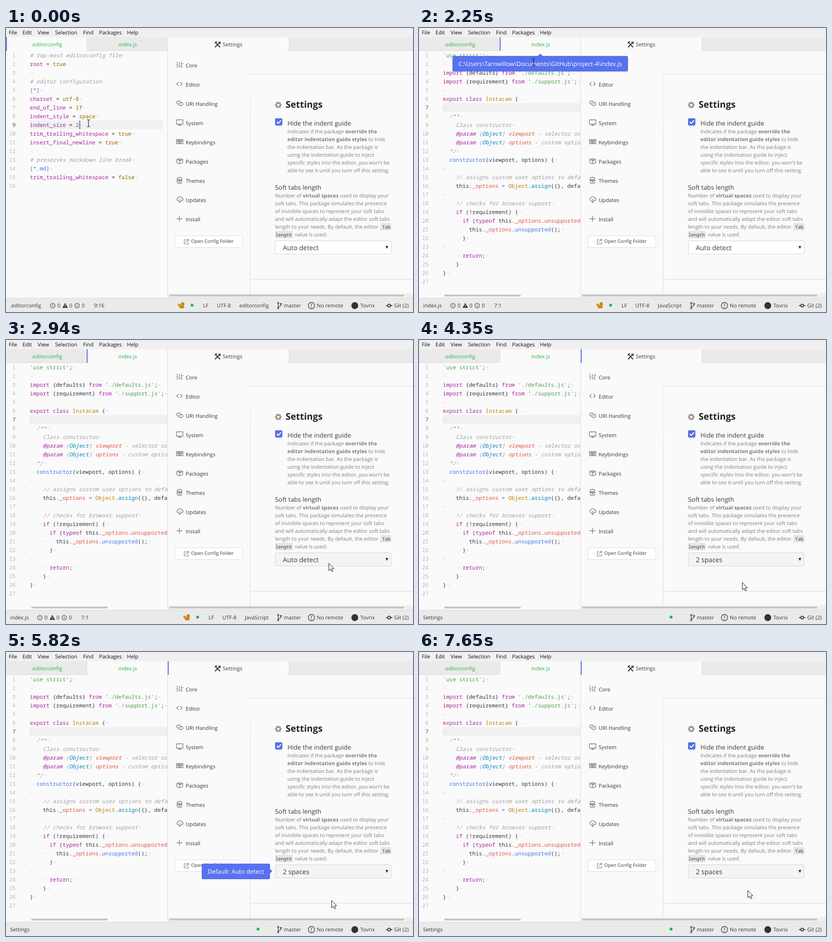
Recreate the animation shown at these times as an HTML page. Size 888 by 620 pixels, loop 8000 ms.

```html
<!DOCTYPE html>
<html lang="en">
<head>
<meta charset="utf-8">
<title>Editor settings</title>
<style>
  html, body { margin: 0; width: 100%; height: 100%; overflow: hidden; background: #fafafa; }
  svg { display: block; }
  text { font-family: "Open Sans", "Noto Sans", sans-serif; font-size: 11.5px; fill: #3a3a3c;
         white-space: pre; text-rendering: geometricPrecision; }
  .mono text, text.mono { font-family: "Noto Sans Mono", "DejaVu Sans Mono", monospace; }
  .mono text { font-size: 11.917px; }
  .icon { fill: none; stroke: #7a7a7c; stroke-width: 1.3; }
  .dark { stroke: #3a3a3c; }
</style>
</head>
<body>
<svg id="stage" width="888" height="620" viewBox="0 0 888 620"></svg>
<script>
const LOOP = 8000, STEP = 30, ROW = 19;
const BORDER = '#dbdbdc', BAR = '#eaeaeb', THUMB = '#c4c4c5', ACCENT = '#526fff', TIP = '#5871ef';
const INVISIBLE = '#d0d0d2', HELP = '#808082';
const INK = { t: '#383a42', c: '#a0a1a7', p: '#a626a4', b: '#4078f2', g: '#50a14f', o: '#986801',
              r: '#e45649', k: '#0184bc', y: '#c18401' };

const text = (x, y, s, attrs = '') => `<text x="${x}" y="${y}" ${attrs}>${s}</text>`;
const sized = (x, y, s, px, color = '#3a3a3c', attrs = '') =>
  text(x, y, s, `style="font-size:${px}px;fill:${color}" ${attrs}`);
const rect = (x, y, w, h, fill, attrs = '') =>
  `<rect x="${x}" y="${y}" width="${w}" height="${h}" fill="${fill}" ${attrs}/>`;
const group = (id, body, attrs = '') => `<g id="${id}" ${attrs}>${body}</g>`;
const icon = (x, y, d, cls = '', attrs = '') =>
  `<path class="icon ${cls}" transform="translate(${x} ${y})" d="${d}" ${attrs}/>`;
const bold = s => `<tspan font-weight="700">${s}</tspan>`;
const span = (s, fill, italic) =>
  `<tspan style="fill:${fill}"${italic ? ' font-style="italic"' : ''}>${s}</tspan>`;

// Each segment starts with an ink letter; capitals and comments are italic.
const configCode = [
  'c# top-most editorconfig file', 'proot|t = |otrue', '', 'c# editor configuration', 'b[*]',
  'pcharset|t = |outf-8', 'pend_of_line|t = |olf', 'pindent_style|t = |ospace', 'pindent_size|t = |o2',
  'ptrim_trailing_whitespace|t = |otrue', 'pinsert_final_newline|t = |otrue', '',
  'c# preserves markdown line break', 'b[*.md]', 'ptrim_trailing_whitespace|t = |ofalse'];
const scriptCode = [
  "g'use strict'|t;", '', "pimport|t {defaults} |pfrom|t |g'./defaults.js'|t;",
  "pimport|t {requirement} |pfrom|t |g'./support.js'|t;", '', 'pexport class |yInstacam|t {', '',
  '  c/**', '    cClass constructor',
  '    P@param |c{|KObject|c} |Rviewport|c - selector or element',
  '    P@param |c{|KObject|c} |Roptions|c - custom options',
  '  c*/', '  bconstructor|t(viewport, options) {', '', '    c// assigns custom user options to defaults',
  '    tthis.|r_options|t |b=|t |yObject|t.|kassign|t({}, defaults, options);', '',
  '    c// checks for browser support', '    pif|t (!requirement) {',
  '      pif|t (|ptypeof|t this.|r_options|t.|runsupported|t === ',
  '        tthis.|r_options|t.|bunsupported|t();', '      t}', '', '      preturn|t;', '    t}', 't}'];

function codeLine(source, i) {
  const body = source.trimStart();
  const dots = '·'.repeat(source.length - body.length);
  const parts = body ? body.split('|').map(p => {
    const key = p[0].toLowerCase();
    return span(p.slice(1), INK[key], key !== p[0] || key === 'c');
  }) : [];
  return text(52, 64 + ROW * i, span(dots, INVISIBLE) + parts.join('') + span('¬', INVISIBLE));
}
function editor(id, code, current) {
  const numbers = [...code, ''].map((_, i) => text(21, 64 + ROW * i, i + 1,
    `text-anchor="end" style="fill:${i + 1 === current ? '#4a4a4e' : '#b8b8ba'}"`));
  return group(id, numbers.join('') + code.map(codeLine).join(''), 'class="mono" clip-path="url(#pane)"');
}

function circleMark(x, y, info) {
  const mark = info ? 'M0 -1V3M0 -3V-2' : 'M0 -3V1M0 2V3';
  return icon(x, y, 'M5 0A5 5 0 1 1 -5 0A5 5 0 1 1 5 0' + mark, 'dark', 'style="stroke-width:1.1"');
}
function fileStatus(name, left, right, language, languageX) {
  const counters = circleMark(102, 606) + text(112, 610, 0) +
    '<path d="M129 600l6 11h-12z" fill="#3a3a3c"/><path d="M129 604v3.5m0 1v1.3" stroke="#eaeaeb" stroke-width="1.2"/>' +
    text(138, 610, 0) + circleMark(155, 606, true) + text(165, 610, 0);
  const squirrel = '<path fill="#d08a11" d="M375 603q2-3 4 0l3 2v-5q3-3 7 0q1 4-1 6q2 4-1 6h-9l2-3-4 0 2-3-3 0z"/>';
  return text(9, 610, name) + `<g transform="translate(${left} 0)">${counters}</g>` +
    `<g transform="translate(${right} 0)">${squirrel}<circle cx="406" cy="605" r="3.2" fill="#2db448"/>` +
    text(430, 610, 'LF') + text(460, 610, 'UTF-8') + '</g>' + text(languageX, 610, language);
}

const menu = [[6, 'File'], [36, 'Edit'], [69, 'View'], [107, 'Selection'], [168, 'Find'], [203, 'Packages'], [264, 'Help']];
const sidebar = [
  ['Core', 'M2 0V4M2 8V13M7 0V7M7 11V13M12 0V2M12 6V13M0 6H4M5 9H10M10 4H15'],
  ['Editor', 'M5 2L1 6L5 10M9 2L13 6L9 10'],
  ['URI Handling', 'M6 8H4A3.2 3.2 0 0 1 4 1.5H7A3.2 3.2 0 0 1 8 7.5M9 4.5H11A3.2 3.2 0 0 1 11 11H8A3.2 3.2 0 0 1 7 5'],
  ['System', 'M.5 .5H14.5V10H.5ZM4 12.5H11M7.5 10V12'],
  ['Keybindings', 'M.5 1.5H14.5V10.5H.5ZM2 4H13M2 6H13M4 8.5H11'],
  ['Packages', 'M1 3L7 1L14 3V10L7 12.5L1 10ZM1 3L7 5.5L14 3M7 5.5V12.5M4 2L10 4.5V7'],
  ['Themes', 'M2 5V12Q7 15 12 12V5M2 5Q1 0 7 0T12 5ZM2 7H6V10H8V7H12'],
  ['Updates', 'M5 9H3A3 3 0 0 1 3 3.5A4.5 4.5 0 0 1 11.5 3A3 3 0 0 1 12 9H10M7.5 5V13M5 10.5L7.5 13L10 10.5'],
  ['Install', 'M7 0V13M.5 6.5H13.5']];
const guideHelp = [
  `Indicates if the package ${bold('override the')}`, `${bold('editor indentation guide styles')} to hide`,
  'the indentation bar. As the package is', 'using the indentation guide to inject',
  "specific styles into the editor, you won't be", 'able to see it until you turn off this setting.'];
const tabsHelp = [
  `Number of ${bold('virtual spaces')} used to display your`, 'soft tabs. This package simulates the presence',
  'of invisible spaces to represent your soft tabs', 'and will automatically adapt the editor soft tabs',
  'length to your needs. By default, the editor'];
const paragraph = (x, y, lines) => lines.map((s, i) => sized(x, y + 17 * i, s, 11.3, HELP)).join('');
const chip = (x, y, w, s, textX) => rect(x, y, w, 16, '#e5e5e6', 'rx="2"') +
  sized(textX, y + 12, s, 9.8, '#3a3a3c', 'class="mono"');

const gear = Array.from({ length: 8 }, (_, i) => {
  const a = i * Math.PI / 4, at = r => `${(r * Math.cos(a)).toFixed(1)} ${(r * Math.sin(a)).toFixed(1)}`;
  return `M${at(4.5)}L${at(7.3)}`;
}).join('');

const settings =
  rect(353, 50, 535, 539, '#fafafa') + rect(353, 60, 179, 42, '#e5e5e6', 'id="hover"') +
  sidebar.map(([name, d], i) => icon(371.5, 74 + 42 * i, d) + text(392, 86 + 42 * i, name)).join('') +
  rect(368.5, 453.5, 148, 26, '#fff', `rx="3" stroke="${BORDER}"`) +
  icon(388, 460.5, 'M5 1.5H1V11H10V7M7 1H10.5V4.5M10.5 1L4.5 7', '', 'style="stroke-width:1.1"') +
  sized(404, 469, 'Open Config Folder', 10.3) +
  rect(532, 50, 1, 530, 'url(#fadeIn)') + rect(533, 100, 355, 1, BORDER) + rect(533, 548, 355, 1, BORDER) +
  rect(353, 579, 535, 10, '#f0f0f0') + rect(356, 582, 513, 4, THUMB, 'rx="2"') +
  `<g transform="translate(594 168)" fill="none" stroke="#88888a"><circle r="4.2" stroke-width="2.4"/><path d="${gear}" stroke-width="2.6"/></g>` +
  sized(610, 174, 'Settings', 20, '#232325', 'font-weight="700"') +
  rect(587, 197, 16, 16, '#5871e8', 'rx="3"') +
  '<path d="M591 205l3 3.5 6-7" fill="none" stroke="#fff" stroke-width="2"/>' +
  sized(614, 213, 'Hide the indent guide', 13.8) + paragraph(614, 230, guideHelp) +
  sized(587, 353, 'Soft tabs length', 13.8) + paragraph(587, 370, tabsHelp) +
  chip(817, 426, 24, 'Tab', 821) + chip(587, 443, 39, 'length', 588) +
  sized(630, 455, 'value is used.', 11.3, HELP) +
  rect(587.5, 464.5, 253, 29, '#fff', 'id="select" rx="3" stroke="#d3d3d5"') +
  sized(604, 485, '', 14.5, '#3a3a3c', 'id="choice"') + '<path d="M828 476h6l-3 6z" fill="#222"/>';

const tabs =
  rect(0, 20, 888, 30, BAR) + rect(0, 49, 888, 1, BORDER) +
  rect(0, 20, 176, 30, '#fafafa', 'id="activeTab"') + rect(176, 20, 1, 30, BORDER) +
  rect(353, 20, 264, 30, '#fafafa') + rect(617, 20, 1, 30, BORDER) + rect(352, 20, 1, 569, BORDER) +
  rect(0, 20, 2, 30, ACCENT, 'id="marker"') +
  sized(55, 40, '.editorconfig', 11.5, '#2db448') + sized(245, 40, 'index.js', 11.5, '#2db448') +
  group('close', icon(333, 32, 'M0 0L8 8M8 0L0 8', '', 'style="stroke-width:1.6"')) +
  icon(455, 29, 'M2 2L12 13M13 1L8 6M6 8L1 13', 'dark', 'style="stroke-width:2.3"') +
  icon(455, 29, 'M0 4L5 0M9 1Q10 6 14 4', 'dark', 'style="stroke-width:1.8"') + text(473, 40, 'Settings');

const ring = (x, y) => `M${x + 1.5} ${y}a1.5 1.5 0 1 1 -3 0a1.5 1.5 0 1 1 3 0`;
const status =
  rect(0, 589, 888, 31, BAR) + rect(0, 589, 888, 1, BORDER) +
  group('configStatus', fileStatus('.editorconfig', 0, 0, 'editorconfig', 509) + text(192, 610, '', 'id="position"') +
    text(232, 610, '(1, 1)', 'id="count"')) +
  group('scriptStatus', fileStatus('index.js', -28, 12, 'JavaScript', 521) + text(164, 610, '7:1')) +
  group('settingsStatus', text(9, 610, 'Settings') + '<circle cx="550" cy="605" r="3.2" fill="#2db448"/>') +
  icon(592, 599, 'M2 3V11M2 9Q8 9 8 5' + ring(2, 1.5) + ring(2, 12.5) + ring(8, 3.5), 'dark') +
  text(606, 610, 'master') +
  icon(666.5, 606, 'M-3 -6.5H3L6.5 -3V3L3 6.5H-3L-6.5 3V-3ZM0 -4V1M0 2.5V4', 'dark') +
  text(678, 610, 'No remote') + '<circle cx="761" cy="606" r="7.5" fill="#333335"/>' + text(773, 610, 'Tovrix') +
  icon(836, 606, 'M-7 0H-3M3 0H7M3 0A3 3 0 1 1 -3 0A3 3 0 1 1 3 0', 'dark', 'style="stroke-width:1.8"') +
  text(847, 610, 'Git (2)');

const tooltip = (id, x, y, w, pointer, s) => group(id, rect(x, y, w, 34, TIP, 'rx="3"') +
  `<path d="${pointer}" fill="${TIP}"/>` + sized(x + w / 2, y + 22, s, 13.2, '#fff', 'text-anchor="middle"'));

const cursors =
  group('arrow', '<path d="M.5 .5V16.5L4.2 13L6.8 18.7L9.3 17.6L6.8 12H11.5Z" fill="#fff" stroke="#111"/>') +
  group('beam', '<path d="M-3.5 -7.5H-1L0 -6.5L1 -7.5H3.5M0 -6.5V6.5M-3.5 7.5H-1L0 6.5L1 7.5H3.5" fill="none" stroke="#222" stroke-width="1.2"/>') +
  group('hand', '<path d="M-1 13L-4 9Q-5 6.5-2 8L0 10V1.5Q1.5-1 3 1.5V6.5Q5 5.5 6 7.5Q8 6.5 9 8.5Q11.5 7.5 11.5 10V15L10 18V20.5H2V18.5Z" fill="#fff" stroke="#111"/><path d="M3 7v4M6 8v3M9 9v2" stroke="#111"/>');

const stage = document.getElementById('stage');
stage.innerHTML =
  '<clipPath id="pane"><rect x="0" y="50" width="352" height="539"/></clipPath>' +
  '<linearGradient id="fadeIn" gradientUnits="userSpaceOnUse" x1="0" y1="60" x2="0" y2="250">' +
  `<stop stop-color="#fafafa"/><stop offset="1" stop-color="${BORDER}"/></linearGradient>` +
  rect(0, 0, 888, 620, '#fafafa') + rect(0, 0, 888, 20, '#f0f0f0') +
  menu.map(([x, s]) => text(x, 14, s, 'style="fill:#111"')).join('') + tabs +
  rect(52, 202, 290, ROW, '#f0f0f1', 'id="line"') +
  group('selection', rect(0, 202, 52, ROW, '#ebebec') + rect(152, 202, 7, ROW, '#e2e2e4')) +
  editor('config', configCode, 9) + editor('script', scriptCode, 7) +
  rect(55, 582, 167, 4, THUMB, 'id="scrollbar" rx="2"') + rect(160, 202, 2, ROW, ACCENT, 'id="caret"') +
  settings + status +
  tooltip('pathTip', 73, 61, 383, 'M259 61l5.5-5 5.5 5z',
    'C:\\Users\\Tarnwillow\\Documents\\GitHub\\project-4\\index.js') +
  tooltip('defaultTip', 427, 462, 149, 'M576 473.5l5 5-5 5z', 'Default: Auto detect') +
  group('cursor', cursors);

const el = Object.fromEntries([...stage.querySelectorAll('[id]')].map(e => [e.id, e]));
const show = (id, on) => el[id].setAttribute('visibility', on ? 'inherit' : 'hidden');
const set = (id, attrs) => Object.entries(attrs).forEach(([k, v]) => el[id].setAttribute(k, v));
const within = (t, a, b) => t >= a && t < b;

// Pointer path as [ms, x, y].
const path = [
  [90, 180, 208], [400, 166, 210], [780, 153, 211], [1020, 153, 211], [1240, 190, 130], [1470, 230, 42],
  [2070, 230, 42], [2100, 231, 42], [2230, 231, 42], [2310, 305, 175], [2370, 382, 324], [2400, 414, 371],
  [2520, 520, 510], [2620, 595, 537], [2800, 675, 505], [2940, 704, 487], [3880, 704, 487], [4050, 705, 529],
  [5020, 705, 529], [5200, 711, 505], [5370, 711, 493], [5560, 711, 493], [5700, 713, 522], [5820, 710, 542],
  [6580, 710, 542], [6900, 720, 539], [7350, 717, 521], [7410, 717, 520]];
function pointer(t) {
  const i = path.findIndex(p => p[0] > t);
  if (i === 0) return path[0].slice(1);
  if (i < 0) return path[path.length - 1].slice(1);
  const [t0, x0, y0] = path[i - 1], [t1, x1, y1] = path[i], k = (t - t0) / (t1 - t0);
  return [Math.round(x0 + (x1 - x0) * k), Math.round(y0 + (y1 - y0) * k)];
}
const sidebarRow = ([x, y]) => x > 353 && x < 532 && y >= 60 && y < 438 ? Math.floor((y - 60) / 42) : -1;

function draw(t) {
  const opened = t >= 1620, selected = !opened && t >= 600, focused = t >= 3540;
  const [x, y] = pointer(t), row = sidebarRow(pointer(t - STEP));

  show('config', !opened);
  show('script', opened);
  show('scrollbar', opened);
  show('selection', selected);
  show('line', !selected);
  set('line', opened ? { y: 164, width: 300 } : { y: 202, width: 290 });
  set('caret', opened ? { x: 52, y: 164 } : { x: 160, y: 202 });
  show('caret', t < 600 || within(t, 1620, 1950) || within(t, 2400, 2880) || within(t, 3390, 3540));

  set('activeTab', opened ? { x: 177, width: 175 } : { x: 0, width: 176 });
  set('marker', { x: focused ? 353 : opened ? 176 : 0 });
  show('close', y < 50 && x > 177 && x < 352);

  show('configStatus', !opened);
  show('scriptStatus', opened && !focused);
  show('settingsStatus', focused);
  show('count', selected);
  el.position.textContent = selected ? '9:15' : '9:16';

  show('hover', row >= 0);
  set('hover', { y: 60 + 42 * row });
  set('select', { fill: t >= 2910 ? '#f4f4f5' : '#fff' });
  el.choice.textContent = t >= 4350 ? '2 spaces' : 'Auto detect';
  show('pathTip', within(t, 2250, 2460));
  show('defaultTip', within(t, 3060, 4350) || within(t, 5340, 6600));

  const shape = x < 352 && y > 50 ? 'beam' : sidebarRow([x, y]) >= 0 ? 'hand' : 'arrow';
  for (const name of ['arrow', 'beam', 'hand']) show(name, name === shape);
  set('cursor', { transform: `translate(${x} ${y})` });
}

const start = performance.now();
function tick() {
  const t = (performance.now() - start) % LOOP;
  draw(Math.floor(t / STEP) * STEP);
  requestAnimationFrame(tick);
}
tick();
</script>
</body>
</html>
```
